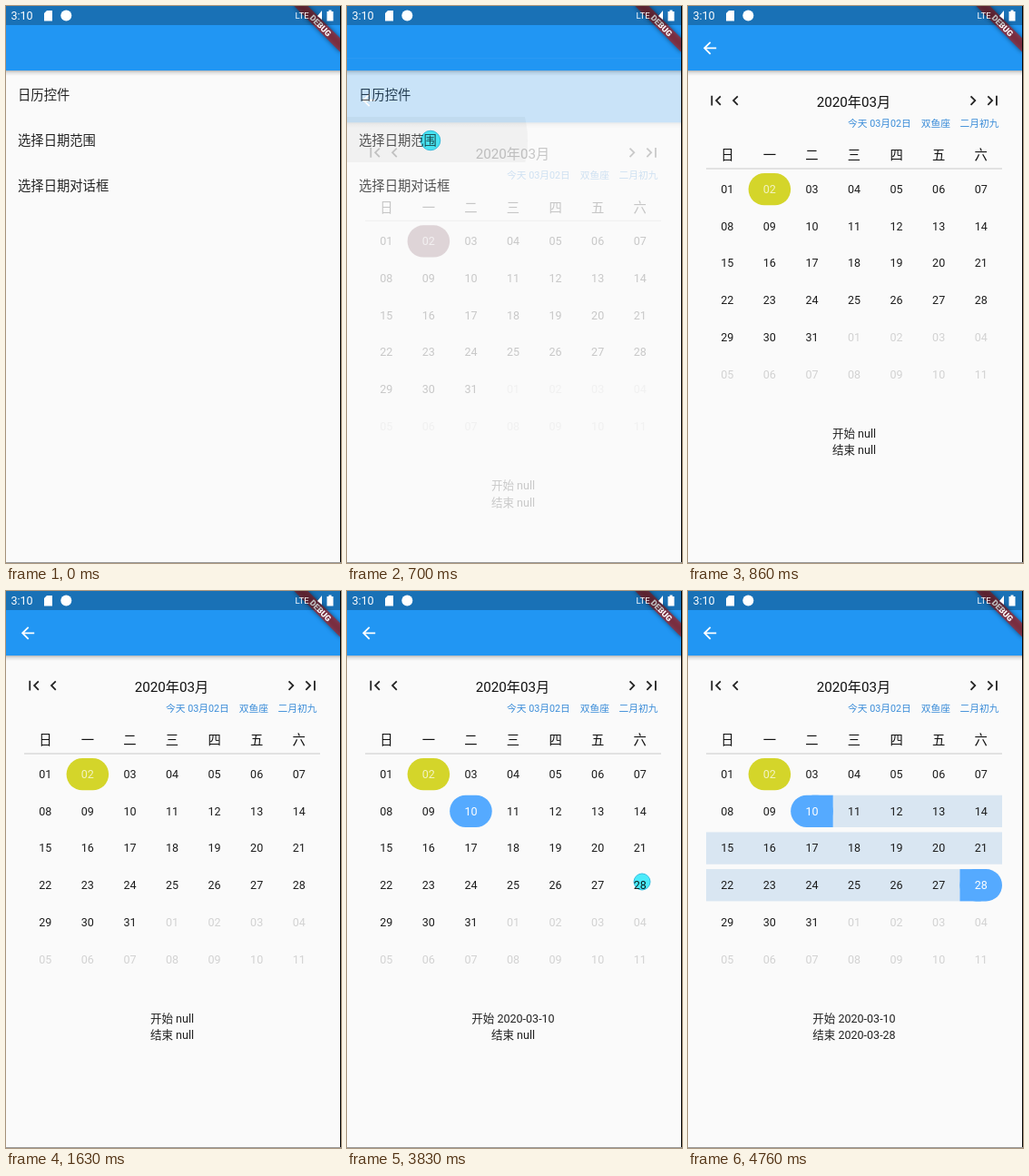
Write an HTML page that moves like this. It is 369x613 px and loops after 5880 ms.

```html
<!DOCTYPE html>
<html lang="zh-CN">
<head>
<meta charset="utf-8">
<style>
  html, body { margin: 0; width: 100%; height: 100%; overflow: hidden; background: #fafafa; }
  svg { display: block; width: 369px; height: 613px; }
  text { font-family: Roboto, "Noto Sans CJK SC", "Noto Sans CJK", "Noto Sans", sans-serif; white-space: pre; }
  #touch { mix-blend-mode: multiply; }
</style>
</head>
<body>
<svg id="stage" viewBox="0 0 369 613">
  <defs>
    <linearGradient id="shade" x2="0" y2="1">
      <stop stop-opacity=".26"/><stop offset=".4" stop-opacity=".1"/><stop offset="1" stop-opacity="0"/>
    </linearGradient>
    <filter id="blur" x="-30%" y="-100%" width="160%" height="300%"><feGaussianBlur stdDeviation="2.4"/></filter>
    <clipPath id="row"><rect y="122" width="368" height="50"/></clipPath>
    <g id="page">
      <rect width="369" height="613" fill="#fafafa"/>
      <rect width="369" height="71" fill="#2196f3"/>
      <rect y="71" width="369" height="6" fill="url(#shade)"/>
    </g>
  </defs>

  <g id="menu">
    <use href="#page"/>
    <g clip-path="url(#row)"><circle id="splash" cx="92" cy="148" fill="#c8c8c8"/></g>
  </g>

  <g id="calendar">
    <use href="#page"/>
    <path fill="#fff" transform="translate(13.3 35.6) scale(.895)" d="M20 11H7.83l5.59-5.59L12 4l-8 8 8 8 1.41-1.41L7.83 13H20z"/>
    <g fill="#222">
      <path transform="translate(20 93.3) scale(.895)" d="M18.41 16.59L13.82 12l4.59-4.59L17 6l-6 6 6 6zM6 6h2v12H6z"/>
      <path transform="translate(41.6 93.3) scale(.895)" d="M15.41 7.41L14 6l-6 6 6 6 1.41-1.41L10.83 12z"/>
      <path transform="translate(303.2 93.3) scale(.895)" d="M10 6L8.59 7.41 13.17 12l-4.58 4.59L10 18l6-6z"/>
      <path transform="translate(324.7 93.3) scale(.895)" d="M5.59 7.41L10.18 12l-4.59 4.59L7 18l6-6-6-6zM16 6h2v12h-2z"/>
    </g>
    <rect x="20" y="178.5" width="326" height="1" fill="#ccc"/>
  </g>

  <circle id="touch"/>

  <g transform="translate(368 0) rotate(45)">
    <rect x="-36" y="25" width="72" height="10.8" opacity=".5" filter="url(#blur)"/>
    <rect x="-36" y="25" width="72" height="10.8" fill="#b71c1c" fill-opacity=".627"/>
    <text y="33.7" font-size="9.1" font-weight="900" fill="#fff" text-anchor="middle">DEBUG</text>
  </g>

  <rect width="369" height="21" fill-opacity=".25"/>
  <g fill="#fff">
    <text x="5.5" y="15.3" font-size="12.5">3:10</text>
    <path d="M45 5h6v11.5h-9V8z"/>
    <circle cx="66.3" cy="10.6" r="6"/>
    <text x="318.6" y="14.3" font-size="9.6">LTE</text>
    <path d="M348 5v10l-5-4z"/>
    <path d="M355.5 4.5h3V6h2v10.5h-7V6h2z"/>
  </g>
  <rect x="368" width="1" height="613"/>
  <rect y="612" width="369" height="1" fill="#999"/>
</svg>
<script>
const LOOP = 5880, STEP = 40;
const COL = 326 / 7, ROW = 40.7, CELL = 35.3;
const BODY = 12.53;
const $ = id => document.getElementById(id);
const menu = $('menu'), calendar = $('calendar'), touch = $('touch'), splash = $('splash');

function add(parent, tag, attrs, content = '') {
  const el = document.createElementNS('http://www.w3.org/2000/svg', tag);
  set(el, attrs);
  el.textContent = content;
  return parent.appendChild(el);
}
function set(el, attrs) {
  for (const key in attrs) el.setAttribute(key, attrs[key]);
}
function label(parent, content, x, y, size, fill = '#212121', anchor = 'middle') {
  return add(parent, 'text', { x, y, fill, 'font-size': size, 'text-anchor': anchor }, content);
}
const cellX = col => 20 + COL * col;
const cellY = row => 184 + ROW * row;
function block(parent, col, row, span, fill, radius = 0) {
  return add(parent, 'rect', {
    x: cellX(col), y: cellY(row), width: COL * span, height: CELL, rx: radius, fill
  });
}
const pill = (parent, col, row, fill) => block(parent, col, row, 1, fill, CELL / 2);

['日历控件', '选择日期范围', '选择日期对话框'].forEach((item, i) =>
  label(menu, item, 13, 103.3 + 50 * i, 14.32, '#212121', 'start'));

label(calendar, '2020年03月', 182.5, 111, 15.2, '#111');
[['今天 03月02日', 176], ['双鱼座', 256.8], ['二月初九', 299.5]].forEach(([note, x]) =>
  label(calendar, note, x, 133, 10.74, '#3a8cd8', 'start'));
[...'日一二三四五六'].forEach((day, i) =>
  label(calendar, day, cellX(i + .5), 169.4, 14.32, '#111'));

const today = pill(calendar, 1, 0);
const range = add(calendar, 'g', {});
block(range, 3, 1, 4, '#d9e6f2');
block(range, 0, 2, 7, '#d9e6f2');
block(range, 0, 3, 6, '#d9e6f2');
block(range, 2.5, 1, .5, '#55aaff');
block(range, 6, 3, .5, '#55aaff');
pill(range, 6, 3, '#55aaff');
const start = pill(calendar, 2, 1, '#55aaff');

const days = Array.from({ length: 42 }, (_, i) => {
  const name = String(i % 31 + 1).padStart(2, '0');
  const fill = i > 30 ? '#d2d2d2' : i === 1 ? '#ffffffb8' : '#1c1c1c';
  return label(calendar, name, cellX(i % 7 + .5), 206 + ROW * Math.floor(i / 7), BODY, fill);
});
const startText = label(calendar, '', 183, 475, BODY);
const endText = label(calendar, '', 183, 493.2, BODY);

// Cubic bezier with control heights 0 and 1; x1 and x2 are the control times.
function ease(x1, x2, t) {
  let lo = 0, hi = 1;
  for (let i = 0; i < 24; i++) {
    const s = (lo + hi) / 2, r = 1 - s;
    if (3 * r * r * s * x1 + 3 * r * s * s * x2 + s ** 3 < t) lo = s; else hi = s;
  }
  return lo * lo * (3 - 2 * lo);
}
const clamp = v => Math.min(1, Math.max(0, v));

const taps = [
  { from: 540, hold: 860, x: 92, y: 148 },
  { from: 2210, hold: 3190, x: 133, y: 241 },
  { from: 3790, hold: 4070, x: 325, y: 320 }
];

function drawTouch(t) {
  const tap = taps.find(p => t >= p.from && t < p.hold);
  touch.style.display = tap ? '' : 'none';
  if (!tap) return;
  const age = Math.min(240, Math.floor((t - tap.from) / STEP) * STEP);
  set(touch, {
    cx: tap.x, cy: tap.y, r: 8.4 + age / 68,
    fill: '#4cf0ff', 'fill-opacity': clamp((240 - age) / 80),
    stroke: '#35c2e6', 'stroke-width': 1
  });
}

function drawPages(t) {
  const now = 540 + Math.floor((t - 540) / STEP) * STEP;
  const p = t < 540 ? 0 : now >= 860 ? 1 : clamp((now - 555) / 357);
  calendar.style.display = p ? '' : 'none';
  set(calendar, {
    opacity: ease(.42, 1, p),
    transform: `translate(0 ${153.25 * (1 - ease(.4, .2, p))})`
  });
  set(today, { fill: now < 740 ? '#7f5260' : now < 820 ? '#ffff3c' : '#d4d52a' });

  const age = now - 540;
  set(splash, {
    r: t < 540 ? 0 : 20 + Math.min(age, 240) * .544,
    opacity: .4 * clamp((240 - age) / 140)
  });
}

function drawSelection(t) {
  const hasStart = t >= 2330, hasEnd = t >= 3910;
  start.style.display = hasStart ? '' : 'none';
  range.style.display = hasEnd ? '' : 'none';
  set(days[9], { fill: hasStart ? '#fff' : '#1c1c1c' });
  set(days[27], { fill: hasEnd ? '#fff' : '#1c1c1c' });
  startText.textContent = '开始 ' + (hasStart ? '2020-03-10' : 'null');
  endText.textContent = '结束 ' + (hasEnd ? '2020-03-28' : 'null');
}

const origin = performance.now();
function frame() {
  const t = (performance.now() - origin) % LOOP;
  drawPages(t);
  drawSelection(t);
  drawTouch(t);
  requestAnimationFrame(frame);
}
frame();
</script>
</body>
</html>
```
